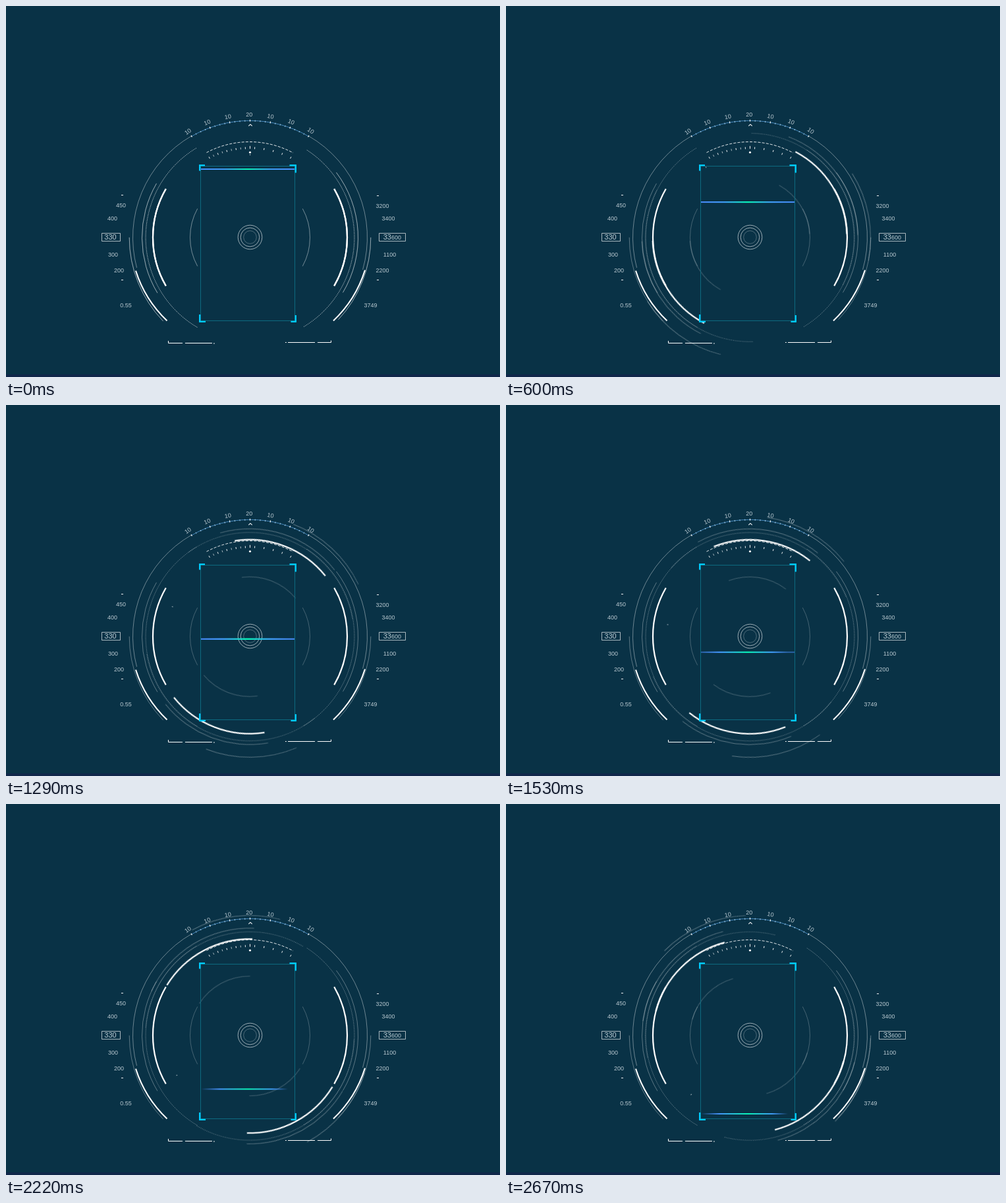
Recreate the animation shown at these times as an HTML page. Size 750 by 564 pixels, loop 2700 ms.

```html
<!DOCTYPE html>
<html lang="en">
<head>
<meta charset="utf-8">
<title>Scanner HUD</title>
<style>
html, body { margin: 0; width: 100%; height: 100%; overflow: hidden; background: #093246; }
svg { display: block; width: 750px; height: 564px; }
text { font-family: "Liberation Sans", Arial, sans-serif; font-size: 9px; fill: #b9c8d0; text-anchor: middle; }
.line { fill: none; stroke: #fff; }
#spin {
  transform-origin: 370.5px 352.4px;
  animation: spin 2700ms -2ms infinite;
}
#scan { animation: scan 2700ms -2ms steps(90) infinite; }
#ends { animation: ends 2700ms -2ms linear infinite; }
@keyframes spin {
  0% { transform: rotate(0deg); animation-timing-function: steps(84); }
  93.3333% { transform: rotate(-134.4deg); animation-timing-function: step-end; }
  94.4444%, 100% { transform: rotate(-135deg); }
}
@keyframes scan {
  from { transform: translateY(0); }
  to { transform: translateY(225.5px); }
}
@keyframes ends {
  0%, 52% { opacity: 1; }
  62%, 100% { opacity: 0; }
}
</style>
</head>
<body>
<svg viewBox="0 0 750 564">
  <defs>
    <linearGradient id="full">
      <stop offset="0" stop-color="#4a8dff"/>
      <stop offset=".25" stop-color="#3f9bf5"/>
      <stop offset=".5" stop-color="#08f5b8"/>
      <stop offset=".75" stop-color="#3f9bf5"/>
      <stop offset="1" stop-color="#4a8dff"/>
    </linearGradient>
    <linearGradient id="soft">
      <stop offset="0" stop-color="#4a8dff" stop-opacity="0"/>
      <stop offset=".2" stop-color="#4594fa"/>
      <stop offset=".5" stop-color="#08f5b8"/>
      <stop offset=".76" stop-color="#3f9bf5"/>
      <stop offset=".93" stop-color="#4a8dff" stop-opacity="0"/>
    </linearGradient>
    <g id="rings" class="line"></g>
  </defs>
  <rect width="750" height="564" fill="#093246"/>
  <rect y="560" width="750" height="4" fill="#10274a"/>

  <g id="dial" class="line"></g>
  <use href="#rings"/>
  <g id="spin">
    <use href="#rings"/>
    <rect x="370" y="225.5" width="1.1" height="1.1" fill="#fff"/>
  </g>

  <g class="line">
    <path d="M197 402.5A180 180 0 0 0 244.5 478.5M545 401.5A180 180 0 0 1 497 478.5" stroke-width="2.1"/>
    <path d="M304.5 222.8A139 139 0 0 1 436 223.3" stroke-dasharray="4 2.2" stroke-opacity=".9"/>
    <path d="M368.3 182.4L371 179.9L373.7 182.4" stroke-width="1.1"/>
    <g stroke-opacity=".65">
      <circle cx="370.5" cy="351.5" r="18.3" stroke-width=".9"/>
      <circle cx="370.5" cy="351.5" r="14.3" stroke-width=".9"/>
      <circle cx="370.5" cy="351.5" r="9.8" stroke-width=".8" stroke-opacity=".35"/>
      <path d="M145.5 345.5h28v12h-28zM566.5 345.5h40v12h-40z"/>
    </g>
    <path d="M246.5 509v3.5H268M272 512.5h41M315 513h1.8M424 511.5h1.8M428 511.5h41M473 511.5h20.5V508.5"/>
    <path d="M175 287.5h3M175 416.5h3M563 288.5h3M563 416.5h3"/>
  </g>
  <circle cx="370.5" cy="222.5" r="1.6" fill="#fff"/>

  <rect x="295.5" y="243.5" width="143" height="235" fill="none" stroke="#0d6a80"/>
  <g id="scan">
    <rect x="296" y="247" width="142" height="2" fill="url(#soft)"/>
    <rect id="ends" x="296" y="247" width="142" height="2" fill="url(#full)"/>
  </g>
  <path d="M294.2 250.5V242.1H302M430.5 242.1H439.8V253.5M294.2 469V479.9H303M432.5 479.9H439.8V470" fill="none" stroke="#0cf" stroke-width="2.3"/>
  <g id="labels">
    <text x="158.5" y="355.3" style="font-size:11px">330</text>
    <text x="586.3" y="355.3"><tspan style="font-size:11px">33</tspan>600</text>
  </g>
</svg>
<script>
const CX = 370.5, CY = 351.8;
const $ = id => document.getElementById(id);

// Angles run counter-clockwise from the right, in degrees.
function point(r, deg) {
  const a = deg * Math.PI / 180;
  return [CX + r * Math.cos(a), CY - r * Math.sin(a)];
}

function add(parent, tag, attrs, text = "") {
  const el = document.createElementNS("http://www.w3.org/2000/svg", tag);
  for (const k in attrs) el.setAttribute(k, attrs[k]);
  el.textContent = text;
  parent.append(el);
}

function arc(parent, r, from, to, attrs) {
  const large = to - from > 180 ? 1 : 0;
  add(parent, "path", { d: `M${point(r, from)}A${r} ${r} 0 ${large} 0 ${point(r, to)}`, ...attrs });
}

function tick(parent, deg, r0, r1, attrs) {
  add(parent, "path", { d: `M${point(r0, deg)}L${point(r1, deg)}`, ...attrs });
}

const rings = $("rings"), dial = $("dial"), labels = $("labels");
const thin = { "stroke-width": .8, "stroke-opacity": .42 };
const faint = { "stroke-width": .8, "stroke-opacity": .3 };
const dots = { "stroke-width": .9, "stroke-opacity": .48, "stroke-dasharray": "1.2 1.2" };
const bold = { "stroke-width": 2.2 };

arc(rings, 183.3, -43, 0, thin);
arc(rings, 183.3, 180, 224, thin);
arc(rings, 164, -30.7, 37, thin);
arc(rings, 164, 150, 211, thin);
arc(rings, 158.4, -59, 57, dots);
arc(rings, 158.4, 121, 240, dots);
arc(rings, 147.5, -30, 30, bold);
arc(rings, 147.5, 150, 210, bold);
arc(rings, 91, -28.7, 28.7, faint);
arc(rings, 91, 151.3, 208.7, faint);

arc(dial, 178, -16, 60, { "stroke-width": .8, "stroke-opacity": .5 });
arc(dial, 178, 120, 195, { "stroke-width": .8, "stroke-opacity": .5 });
arc(dial, 177.5, 60, 120, { stroke: "#4a90c8", "stroke-width": .9 });

for (let a = -30; a <= 30; a += 2.5) {
  const major = a % 10 === 0;
  tick(dial, 90 - a, 176.2, major ? 179 : 178.4, { "stroke-width": major ? 1.2 : .9, stroke: major ? "#fff" : "#b5d8f2" });
}
for (let a = -27; a <= 27; a += a < 3 ? 3 : 6) {
  const mid = a === 0;
  tick(dial, 90 - a, mid ? 134.8 : 134.5, mid ? 139 : 137.5, { "stroke-opacity": mid || a % 2 ? .95 : .65 });
}

for (let a = -30; a <= 30; a += 10) {
  const [x, y] = point(186.6, 90.4 - a);
  add(labels, "text", { x, y: y + 3.1, transform: `rotate(${a * 1.15} ${x} ${y})` }, a ? "10" : "20");
}
const readings = [
  ["450", 174.5, 303], ["400", 161.5, 323], ["300", 162.5, 378], ["200", 171.5, 402], ["0.55", 182, 455],
  ["3200", 571.5, 304], ["3400", 580.5, 323], ["1100", 582.5, 378], ["2200", 571.5, 402], ["3749", 553.5, 455]
];
for (const [s, x, y] of readings) add(labels, "text", { x, y: y + 3.2 }, s);
</script>
</body>
</html>
```
